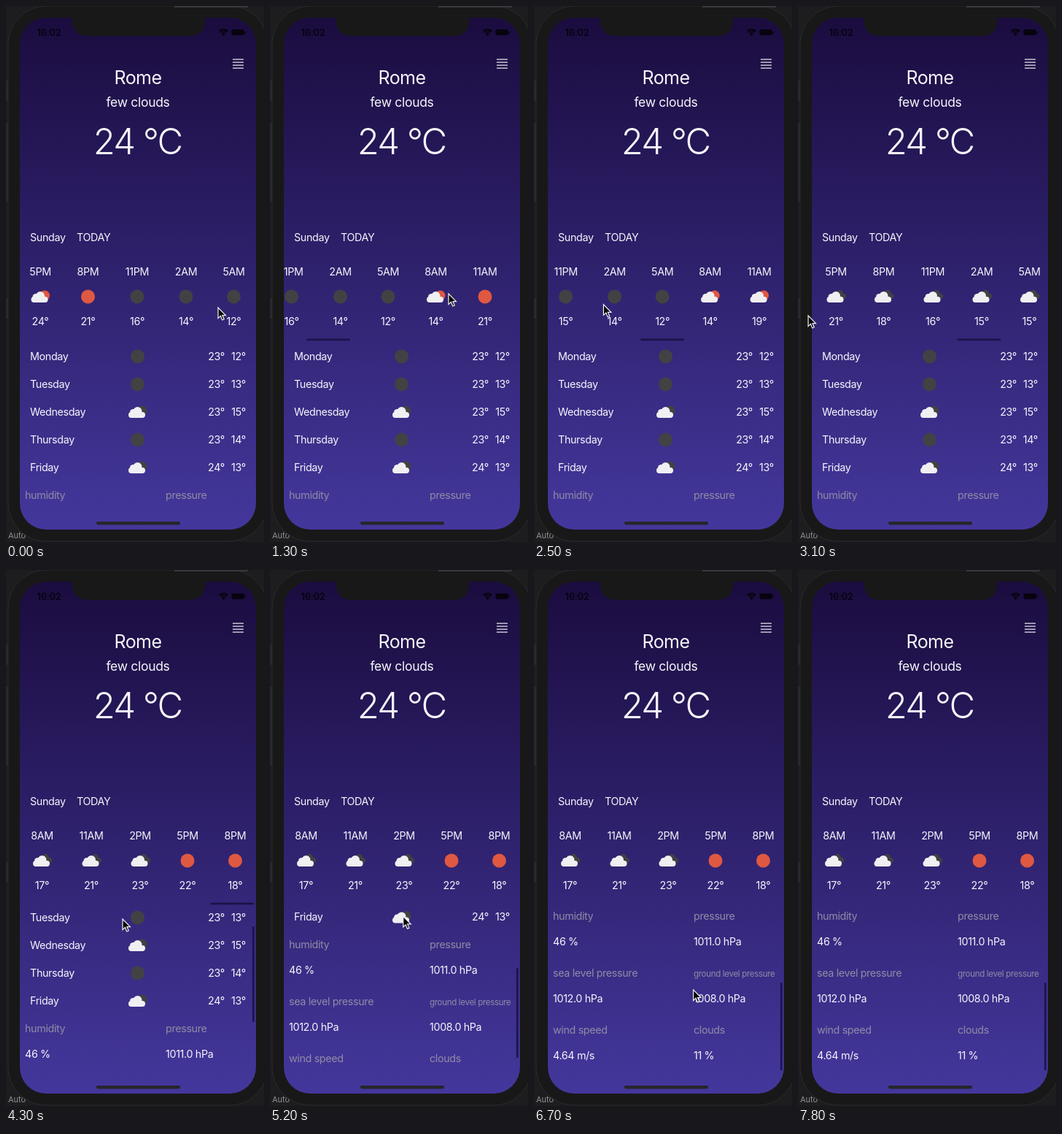
These frames come from a looping animation (354x734 px, 8000 ms). An HTML page with a canvas:

```html
<!DOCTYPE html>
<html lang="en">
<head>
<meta charset="utf-8">
<title>Weather</title>
<style>
html, body { margin: 0; width: 100%; height: 100%; overflow: hidden; background: #1d1d20; }
canvas { display: block; width: 354px; height: 734px; }
</style>
</head>
<body>
<canvas id="stage"></canvas>
<script>
const W = 354, H = 734, LOOP = 8000, STEP = 100;
const canvas = document.getElementById('stage');
const ctx = canvas.getContext('2d');
const ratio = window.devicePixelRatio || 1;
canvas.width = W * ratio;
canvas.height = H * ratio;

const BEZEL = '#181818', SUN = '#df5842', MOON = '#424244', CLOUD = '#f0eff2';
const SCREEN = { x: 19, y: 16, w: 324, h: 701, r: 36 };
const LIST = { top: 457, bottom: 688 };

// Forecast every three hours, starting at 5PM
const HOURS = ['5PM', '8PM', '11PM', '2AM', '5AM', '8AM', '11AM', '2PM'];
const HOUR_X = [47, 112.5, 180, 247, 312.5, 378, 445.5, 512.5];
const DAY_WIDTH = 530.5;
const TEMPS = [24, 21, 16, 14, 12, 14, 21, 23, 20, 16, 15, 14, 12,
  14, 19, 22, 21, 18, 16, 15, 15, 17, 21, 23, 22, 18];
const SKIES = 'fsmmmfssssmmmfffbbbbbbbbss';

const DAYS = [
  ['Monday', 'm', 23, 12], ['Tuesday', 'm', 23, 13], ['Wednesday', 'n', 23, 15],
  ['Thursday', 'm', 23, 14], ['Friday', 'n', 24, 13]
];
const DETAILS = [
  ['humidity', '46 %', 'pressure', '1011.0 hPa'],
  ['sea level pressure', '1012.0 hPa', 'ground level pressure', '1008.0 hPa'],
  ['wind speed', '4.64 m/s', 'clouds', '11 %']
];

// Rows of [time, value, ...]
const SIDE_SCROLL = [[0, 0], [500, 0], [1300, 150.5], [2000, 370.5], [3100, 1056], [3900, 1389.5]];
const LIST_SCROLL = [[4000, 0], [4300, 42], [4900, 130], [5500, 175], [6100, 194], [6500, 196]];
const POINTER = [[0, 291, 413], [500, 297, 400], [1300, 245, 394], [2000, 186, 401],
  [3100, 14, 424], [3700, 130, 480], [4000, 159, 520], [4300, 160, 478],
  [4700, 166, 430], [6100, 213, 582], [7500, 222, 564]];

// Monotone cubic interpolation of one column
function track(keys, t, col = 1) {
  const last = keys.length - 1;
  if (t <= keys[0][0]) return keys[0][col];
  if (t >= keys[last][0]) return keys[last][col];
  const slope = i => (keys[i + 1][col] - keys[i][col]) / (keys[i + 1][0] - keys[i][0]);
  const tangent = i => {
    if (i === 0 || i === last) return 0;
    const a = slope(i - 1), b = slope(i);
    return a * b > 0 ? 2 * a * b / (a + b) : 0;
  };
  let i = 0;
  while (t >= keys[i + 1][0]) i++;
  const h = keys[i + 1][0] - keys[i][0], u = (t - keys[i][0]) / h, v = 1 - u;
  return v * v * (1 + 2 * u) * keys[i][col] + u * u * (3 - 2 * u) * keys[i + 1][col]
    + h * u * v * (v * tangent(i) - u * tangent(i + 1));
}

function box(x, y, w, h, r, color) {
  ctx.beginPath();
  ctx.roundRect(x, y, w, h, r);
  ctx.fillStyle = color;
  ctx.fill();
}

function disc(x, y, r, color) {
  ctx.beginPath();
  ctx.arc(x, y, r, 0, 2 * Math.PI);
  ctx.fillStyle = color;
  ctx.fill();
}

function text(str, x, y, { size = 14.3, align = 'left', color = '#f6f5fa', weight = 400, spacing = -0.35 } = {}) {
  ctx.font = `${weight} ${size}px Inter, sans-serif`;
  ctx.letterSpacing = spacing + 'px';
  ctx.textAlign = align;
  ctx.fillStyle = color;
  ctx.fillText(str, x, y);
}

function cloud(x, y, color) {
  box(x - 11.5, y, 23, 8, 4, color);
  disc(x + 1, y - 1, 6, color);
  disc(x - 5, y + 0.5, 4.5, color);
}

// s: sun, m: moon, f: sun and cloud, n: moon and cloud, b: broken clouds
function sky(kind, x, y) {
  if (kind === 's') return disc(x, y, 9.5, SUN);
  if (kind === 'm') return disc(x, y, 9.5, MOON);
  if (kind === 'b') {
    box(x - 4, y - 4, 18, 7, 3.5, MOON);
    disc(x + 5, y - 4, 5, MOON);
  } else {
    disc(x + 6, y - 1.5, 7, kind === 'f' ? SUN : MOON);
  }
  cloud(x - 1, y, CLOUD);
}

function drawDesk() {
  ctx.fillStyle = '#1d1d20';
  ctx.fillRect(0, 0, W, H);
  ctx.fillStyle = '#29292c';
  ctx.fillRect(0, 102, 4, 28);
  ctx.fillRect(0, 160, 4, 108);
  ctx.fillRect(0, 400, 4, 28);
  text('Auto', 3, 729, { size: 11, color: '#8f8f92', spacing: 0 });
  box(3, 0, 356, 733, 52, BEZEL);
  ctx.strokeStyle = '#2b2b2c';
  ctx.lineWidth = 1;
  ctx.stroke();
  ctx.fillStyle = '#39393b';
  ctx.fillRect(231, 0, 101, 2);
}

function drawStatusBar() {
  const ink = '#07040f';
  ctx.beginPath();
  ctx.moveTo(86, 15);
  ctx.quadraticCurveTo(91, 16, 91, 22);
  ctx.arcTo(91, 41, 112, 41, 19);
  ctx.arcTo(273, 41, 273, 22, 19);
  ctx.lineTo(273, 22);
  ctx.quadraticCurveTo(273, 16, 278, 15);
  ctx.fillStyle = BEZEL;
  ctx.fill();

  text('16:02', 42.5, 40.5, { size: 12.8, weight: 600, color: ink, spacing: -0.2 });
  ctx.strokeStyle = ink;
  ctx.lineWidth = 1.7;
  for (const r of [3.6, 6.4, 8.6]) {
    ctx.beginPath();
    ctx.arc(298.5, 40.5, r, -Math.PI * 0.75, -Math.PI * 0.25);
    ctx.stroke();
  }
  disc(298.5, 39.5, 1.4, ink);
  box(309.5, 32, 17.5, 8, 2.5, ink);
  box(327.6, 34.5, 1.3, 3, 0.6, ink);
}

function drawHeader() {
  const center = { align: 'center' };
  text('Rome', 181, 106.5, { ...center, size: 25, spacing: -0.5 });
  text('few clouds', 181, 137.5, { ...center, size: 17.5, spacing: -0.3 });
  text('24 °C', 180.5, 203, { ...center, size: 49, weight: 300, spacing: -2 });
  text('Sunday', 33, 322);
  text('TODAY', 97, 322);
  ctx.fillStyle = '#f0eff5';
  for (let i = 0; i < 4; i++) ctx.fillRect(311, 72.5 + 4 * i, 15, 1.2);
}

function drawHours(scroll) {
  TEMPS.forEach((temp, i) => {
    const x = HOUR_X[i % 8] + Math.floor(i / 8) * DAY_WIDTH - scroll;
    if (x < -20 || x > W + 20) return;
    text(HOURS[i % 8], x, 369, { align: 'center' });
    sky(SKIES[i], x, 398);
    text(temp + '°', x, 437, { align: 'center' });
  });
}

function drawList(scroll) {
  ctx.save();
  ctx.beginPath();
  ctx.rect(SCREEN.x, LIST.top, SCREEN.w, LIST.bottom - LIST.top);
  ctx.clip();
  ctx.translate(0, -scroll);
  DAYS.forEach(([name, kind, high, low], i) => {
    const y = 480 + 38 * i;
    text(name, 33, y + 5);
    sky(kind, 180.5, y);
    text(high + '°', 300, y + 5, { align: 'right' });
    text(low + '°', 329, y + 5, { align: 'right' });
  });
  DETAILS.forEach((row, i) => {
    const y = 675 + 77.8 * i;
    for (const col of [0, 2]) {
      const x = col ? 219 : 26, label = row[col];
      const size = label.length > 20 ? 11.6 : 14.3;
      text(label, x, y, { size, color: '#908ba5' });
      text(row[col + 1], x, y + 35);
    }
  });
  ctx.restore();
}

function drawIndicators(t, side, list) {
  const ink = '#1c1348';
  if (side > 0 && t < 4700) box(22 + side * 0.186, 455.6, 60, 2.6, 1.3, ink);
  if (list > 0) {
    const top = 488 + (list - 42) * 0.5, bottom = 619 + (list - 42) * 0.43;
    box(338, top, 2.6, bottom - top, 1.3, ink);
  }
}

function drawPointer(x, y) {
  const path = new Path2D('M0 0V14.6L3.4 11.4L5.7 17L8.2 16L5.9 10.6H10.4Z');
  ctx.save();
  ctx.translate(x, y);
  ctx.fillStyle = '#050505';
  ctx.strokeStyle = '#f2f2f2';
  ctx.lineWidth = 1.2;
  ctx.fill(path);
  ctx.stroke(path);
  ctx.restore();
}

function draw(t) {
  const side = track(SIDE_SCROLL, t), list = track(LIST_SCROLL, t);
  ctx.setTransform(ratio, 0, 0, ratio, 0, 0);
  drawDesk();

  const shade = ctx.createLinearGradient(0, SCREEN.y, 0, SCREEN.y + SCREEN.h);
  shade.addColorStop(0, '#1b0c3f');
  shade.addColorStop(1, '#43379c');
  ctx.save();
  box(SCREEN.x, SCREEN.y, SCREEN.w, SCREEN.h, SCREEN.r, shade);
  ctx.clip();
  drawHeader();
  drawHours(side);
  drawList(list);
  drawIndicators(t, side, list);
  box(124, 706, 115, 4.4, 2.2, '#26252c');
  ctx.restore();

  drawStatusBar();
  if (t < 7800) drawPointer(track(POINTER, t, 1), track(POINTER, t, 2));
}

const start = performance.now();
function tick() {
  const t = (performance.now() - start) % LOOP;
  draw(Math.floor(t / STEP) * STEP);
  requestAnimationFrame(tick);
}
tick();
</script>
</body>
</html>
```
